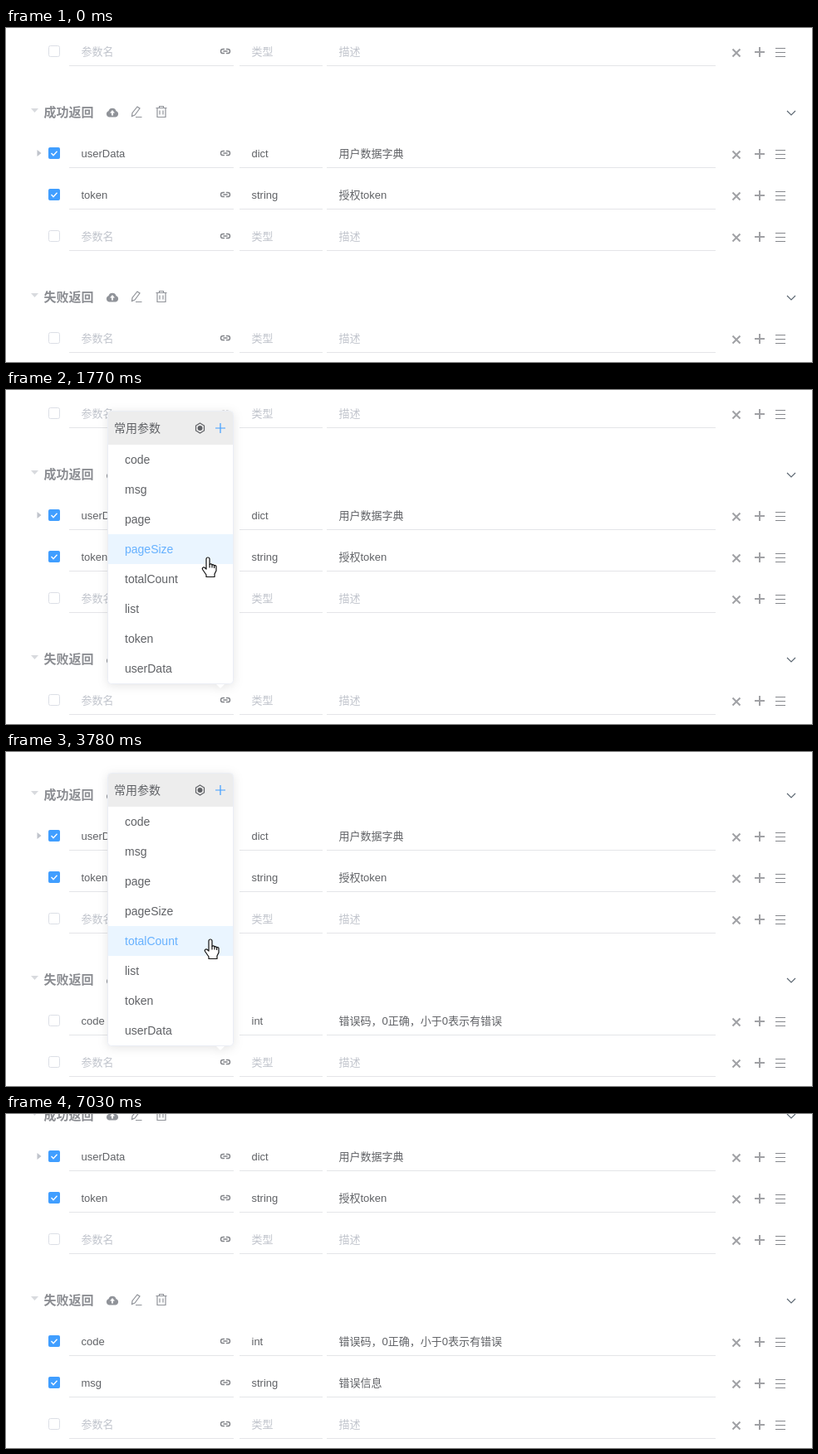
These frames come from a looping animation (970x403 px, 7.81 s). An HTML page:

```html
<!DOCTYPE html>
<html lang="zh">
<head>
<meta charset="utf-8">
<title>返回参数</title>
<style>
  html, body { margin: 0; width: 100%; height: 100%; overflow: hidden; background: #fff; }
  svg { display: block; }
  text { font: 13px "Liberation Sans", "Noto Sans CJK SC", "Noto Sans CJK", sans-serif; fill: #606266; }
  .hint { fill: #c0c4cc; }
  .head { font-size: 15px; font-weight: bold; fill: #8b8d92; }
  .line { fill: #e4e5e8; }
  .box { fill: #fff; stroke: #dcdfe6; }
  .fresh { opacity: var(--tick); }
  .icon { fill: none; stroke: #909399; stroke-width: 1.2; }
  #menu { transform-origin: 198px 355px; }
  #menu text { font-size: 14px; }
  #menu .card { filter: drop-shadow(0 2px 6px rgba(0, 0, 0, .1)); }
  .item rect { fill: none; }
  .item.on rect { fill: #eaf5ff; }
  #menu .item.on text { fill: #66b1ff; }
</style>
</head>
<body>
<svg id="stage" width="970" height="403" viewBox="0 0 970 403">
  <defs>
    <g id="link" fill="none" stroke="#85878c" stroke-width="1.5">
      <path d="M-1-2.6H-2.9a2.6 2.6 0 0 0 0 5.2H-1M1-2.6H2.9a2.6 2.6 0 0 1 0 5.2H1M-2.6 0H2.6"/>
    </g>
    <g id="tools" fill="none" stroke="#a0a1a5">
      <path stroke-width="2" d="M874.5-2.500l9 9m0-9l-9 9M901 1h12M907-5v12"/>
      <path stroke="#85878c" stroke-width="1.2" d="M926-3.500h12M926 1.500h12M926 6.500h12"/>
    </g>
    <g id="tick">
      <rect x="51" y="-7" width="14" height="14" rx="2" fill="#409eff"/>
      <path d="M54.500 0l2.500 2.800 4.500-5" fill="none" stroke="#fff" stroke-width="1.3"/>
    </g>
    <g id="actions">
      <path d="M30-4h9l-4.500 5z" fill="#d8dade"/>
      <g transform="translate(128 0.500)">
        <path d="M-4 6A3.800 3.800 0 0 1-4.600-1.300A4.800 4.800 0 0 1 4.600-1.300A3.800 3.800 0 0 1 4 6z" fill="#909399"/>
        <path d="M0-2.500L-3 1H-1V4H1V1H3z" fill="#fff"/>
      </g>
      <path class="icon" transform="translate(157 0)" d="M-5.500 5.500L-5 1.500L1-6L4-4L-2 4ZM-1 6.500H6.500"/>
      <path class="icon" transform="translate(187 0)" d="M-6.500-4.500H6.500M-2.500-4.500V-6.500H2.500V-4.500M-5-4.500V6.500H5V-4.500M-2-1.500V3.500M2-1.500V3.500"/>
      <path d="M940-1l5 5 5-5" fill="none" stroke="#5a6570" stroke-width="1.1"/>
    </g>
  </defs>

  <g id="hover">
    <rect x="27" y="-25" width="932" height="50" fill="#f5f7fa"/>
    <path d="M76-14h200v31H76zM281-14h100v31H281zM386-14h468v31H386z" fill="#fff"/>
  </g>
  <g id="list"></g>

  <g id="menu">
    <g class="card">
      <path d="M252 354h12l-6 6z" fill="#fff"/>
      <rect x="122.500" y="25.500" width="151" height="329" rx="4" fill="#fff" stroke="#ebeef5"/>
    </g>
    <path d="M123 66V30q0-4 4-4h142q4 0 4 4v36z" fill="#ededed"/>
    <text x="130" y="51">常用参数</text>
    <path d="M233.500 40l5 3v6l-5 3-5-3v-6z" fill="none" stroke="#606266" stroke-width="1.2"/>
    <circle cx="233.500" cy="46" r="3" fill="#606266"/>
    <path d="M252 46h12M258 40v12" stroke="#409eff" stroke-width="1.2"/>
    <g id="items"></g>
  </g>

  <g id="cursor" stroke="#111" stroke-linejoin="round">
    <g id="hand" fill="#fff" stroke-width="1.200">
      <path d="M-2 2a2 2 0 0 1 4 0V8.500a1.800 1.800 0 0 1 3 .5 1.800 1.800 0 0 1 2.600 .8 1.600 1.600 0 0 1 2.400 1.600V16L8 20V23.500H-2V21L-6.500 14.500a1.700 1.700 0 0 1 2.500-2.200L-2 14z"/>
      <path d="M2 8.500V12.500M5 9V12.500M7.600 9.800V13"/>
    </g>
    <path id="beam" fill="none" stroke-width="1.200" d="M-3-7.500h2.500l.5.500.500-.5H3M0-7V7M-3 7.500h2.500l.5-.5.500.5H3"/>
    <path id="arrow" fill="#fff" d="M0 0V17l4-4 2.500 6 2.500-1-2.500-6H12z"/>
  </g>
</svg>

<script>
const LOOP = 7810, STEP = 77.3;
const $ = id => document.getElementById(id);
const clamp = v => Math.min(1, Math.max(0, v));

const NAMES = ['code', 'msg', 'page', 'pageSize', 'totalCount', 'list', 'token', 'userData'];
const ADDED = [
  ['code', 'int', '错误码，0正确，小于0表示有错误'],
  ['msg', 'string', '错误信息']
];
// When the menu opens, when it is clicked, when the pointer lets go
const MENUS = [[1210, 2518, 2518], [3450, 4605, 4690]];
// Pointer stops: time, x, y
const PATH = [
  [60, 290, 412], [765, 259, 377], [1469, 259, 377], [1778, 243, 202],
  [2010, 217, 96], [2087, 218, 90], [2551, 218, 90], [3165, 259, 377],
  [3500, 259, 377], [3788, 246, 226], [4250, 229, 129], [4638, 229, 129],
  [5410, 262, 328], [6030, 310, 335], [6560, 310, 335], [7030, 350, 412]
];

const label = (x, s, cls = '', y = 5) => `<text class="${cls}" x="${x}" y="${y}">${s}</text>`;
const bar = (x, w) => `<rect class="line" x="${x}" y="17" width="${w}" height="1"/>`;
const at = (y, s) => `<g transform="translate(0 ${y})">${s}</g>`;
const heading = (y, s) => at(y, label(45.5, s, 'head', 6) + '<use href="#actions"/>');

function row(y, data, fresh) {
  const [name, type, note] = data || ['参数名', '类型', '描述'];
  const cls = data ? '' : 'hint';
  return at(y,
    '<rect class="box" x="51.5" y="-6.5" width="13" height="13" rx="2"/>' +
    (data ? `<use href="#tick" class="${fresh ? 'fresh' : ''}"/>` : '') +
    (name === 'userData' ? '<path d="M37.500-4v8l5-4z" fill="#c0c4cc"/>' : '') +
    label(90.5, name, cls) + label(295.5, type, cls) + label(400.5, note, cls) +
    bar(76, 198) + bar(281, 100) + bar(386, 468) +
    '<use href="#link" x="264"/><use href="#tools"/>');
}

function drawList(stage) {
  let s = row(28) + heading(101, '成功返回') +
    row(151, ['userData', 'dict', '用户数据字典']) +
    row(201, ['token', 'string', '授权token']) + row(251) +
    heading(324, '失败返回');
  for (let i = 0; i <= stage; i++)
    s += row(374 + 50 * i, i < stage && ADDED[i], i === stage - 1);
  $('list').innerHTML = s;
  $('list').setAttribute('transform', `translate(0 ${-50 * stage})`);
}

$('items').innerHTML = NAMES.map((s, i) => `<g class="item">
  <rect x="123" y="${66 + 36 * i}" width="150" height="36"/>${label(143, s, '', 89 + 36 * i)}</g>`).join('');
const items = [...document.querySelectorAll('.item')];

// cubic-bezier(.23, 1, .32, 1)
function easeOut(x) {
  let lo = 0, hi = 1;
  for (let i = 0; i < 20; i++) {
    const s = (lo + hi) / 2, r = 1 - s;
    if (3 * r * r * s * .23 + 3 * r * s * s * .32 + s ** 3 < x) lo = s; else hi = s;
  }
  return 1 - (1 - lo) ** 3;
}

function pointer(t) {
  const i = PATH.findIndex(p => p[0] > t);
  if (i < 1) return [0, 500];
  const [t0, x0, y0] = PATH[i - 1], [t1, x1, y1] = PATH[i];
  const u = (t - t0) / (t1 - t0), e = u * u * (3 - 2 * u);
  return [x0 + (x1 - x0) * e, y0 + (y1 - y0) * e];
}

const show = (id, on) => $(id).setAttribute('display', on ? 'inline' : 'none');
const move = (id, x, y) => $(id).setAttribute('transform', `translate(${x} ${y})`);
let drawn = -1;

function render(t) {
  const stage = MENUS.filter(m => t >= m[1]).length;
  if (stage !== drawn) drawList(drawn = stage);
  const [x, y] = pointer(t);

  // Menu
  const last = MENUS.filter(m => t >= m[0]).pop();
  const closing = last && t >= last[1];
  const open = !last ? 0 : closing
    ? 1 - easeOut(clamp((t - last[1]) / 300))
    : easeOut(clamp((t - last[0]) / 300));
  const menu = $('menu');
  show('menu', open > .002);
  menu.style.opacity = open;
  menu.style.transform = `translateY(${closing ? -50 : 0}px) scaleY(${open})`;
  const inside = last && t < last[2] && x > 123 && x < 273 && y > 25 && y < 355;
  const picked = closing ? stage - 1 : inside ? Math.floor((y - 66) / 36) : -1;
  items.forEach((el, i) => el.classList.toggle('on', i === picked));
  $('stage').style.setProperty('--tick', last ? clamp((t - last[1] - 50) / 150) : 0);

  // Hovered row
  const rows = [28, 151, 201, 251, 374, 424, 474].slice(0, 5 + stage).map(c => c - 50 * stage);
  const busy = inside || (closing && t < last[1] + 70);
  const c = busy ? undefined : rows.find(r => y >= r - 25 && y < r + 25);
  show('hover', c !== undefined);
  if (c !== undefined) move('hover', 0, c);

  // Pointer
  const over = rows.find(r => y >= r - 14 && y < r + 17);
  const hand = inside || (over !== undefined && Math.abs(x - 264) < 8 && Math.abs(y - over) < 7);
  const beam = !hand && over !== undefined && x > 76 && x < 854;
  move('cursor', Math.round(x), Math.round(y));
  show('hand', hand);
  show('beam', beam);
  show('arrow', !hand && !beam);
}

const start = performance.now();
function tick() {
  const now = (performance.now() - start) % LOOP;
  render(Math.floor((now + 16) / STEP) * STEP);
  requestAnimationFrame(tick);
}
tick();
</script>
</body>
</html>
```
